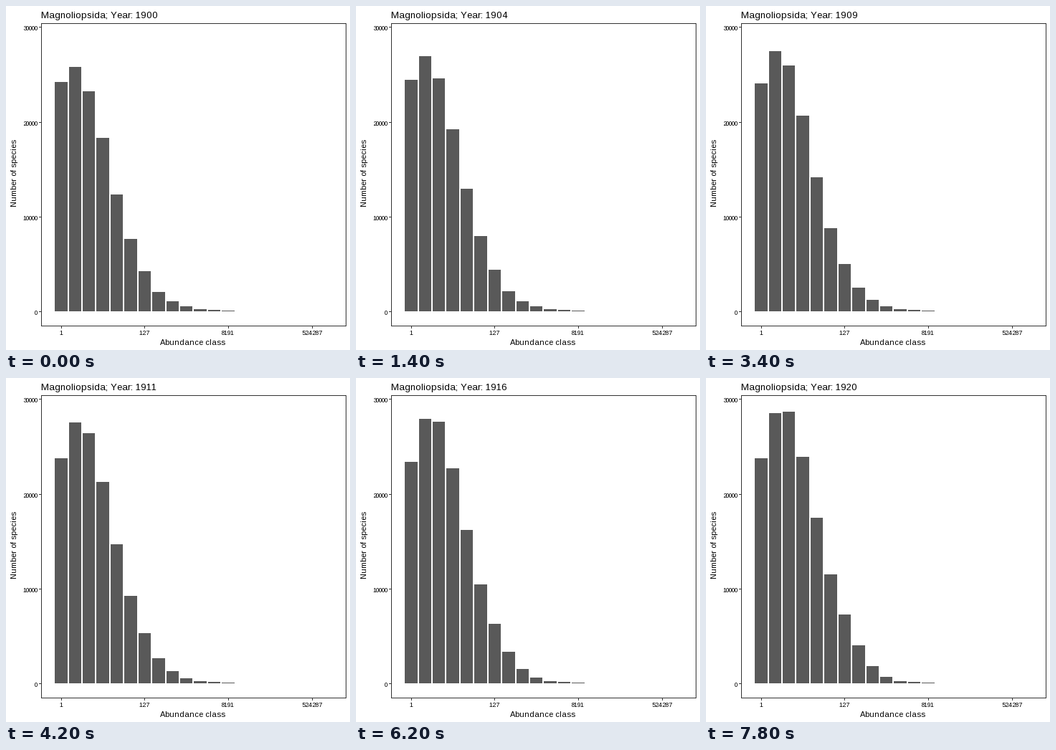
Animation of 480 by 480 pixels, one loop 8000 ms. Source, as a matplotlib script:

```python
import numpy as np
import matplotlib.pyplot as plt
from matplotlib.animation import FuncAnimation
from matplotlib.patches import Rectangle

SIZE, DPI = 480, 100
FRAMES, STEP_MS = 40, 200
BARS, BASE = 13, 426
BAR, LINE, INK = "#595959", "#333333", "#000000"

plt.rcParams.update({
    "font.family": "Liberation Sans",
    "text.hinting": "force_autohint",
    "text.hinting_factor": 1,
    "text.kerning_factor": 6,
})

# Bar heights in pixels in the first year, and their change by the last one.
START = [320, 341, 307, 242, 163, 101, 56, 27]
GAIN = [-6, 36, 72, 74, 68, 51, 40, 26, 11, 2]

fig = plt.figure(figsize=(SIZE / DPI, SIZE / DPI), dpi=DPI, facecolor="white")
ax = fig.add_axes([0, 0, 1, 1])
ax.set_xlim(0, SIZE)
ax.set_ylim(SIZE, 0)
ax.axis("off")


def box(x0, y0, x1, y1, color=LINE):
    patch = Rectangle((x0, y0), x1 - x0, y1 - y0, fc=color, lw=0, aa=False)
    return ax.add_patch(patch)


def label(x, y, text, px, ha="center", va="baseline", **kw):
    return ax.text(x, y, text, size=px * 72 / DPI, color=INK,
                   ha=ha, va=va, **kw)


def bar_right(n):
    return int(86.1 + 19.42 * n)


def height(n, t):
    """Higher classes start to rise later; the lowest ones also sway."""
    if n < len(START):
        start = START[n]
    else:
        start = START[-1] * 0.5 ** (n - len(START) + 1)
    gain = GAIN[n] if n < len(GAIN) else 0
    sway = max(0, 6 - 2.5 * n) * np.sin(2 * np.pi * t)
    return start + gain * t ** (0.45 + 0.2 * n) + sway


bars = [box(bar_right(n - 1) + 2, BASE, bar_right(n), BASE, BAR)
        for n in range(BARS)]

# Panel border
box(49, 24, 475, 25)
box(49, 446, 475, 447)
box(49, 24, 50, 447)
box(474, 24, 475, 447)

for k in range(4):
    y = int(426.8 - 132.4 * k)
    box(46, y, 49, y + 1)
    label(44, y + 5, str(10000 * k), 9, ha="right")

    x = int(77.2 + 116.7 * k)
    box(x, 447, x + 1, 450)
    label(x, 459, str(2 ** (6 * k + 1) - 1), 9)

label(260.5, 473, "Abundance class", 11)
label(17, 233.5, "Number of species", 11, ha="right", va="center", rotation=90)
title = label(49, 17, "", 13, ha="left")


def draw(i):
    title.set_text(f"Magnoliopsida; Year: {1900 + (i + 1) // 2}")
    for n, bar in enumerate(bars):
        h = round(float(height(n, i / (FRAMES - 1))))
        bar.set_y(BASE - h)
        bar.set_height(h)
    return [title, *bars]


anim = FuncAnimation(fig, draw, frames=FRAMES, interval=STEP_MS,
                     init_func=lambda: draw(0), repeat=True)
plt.show()
```
